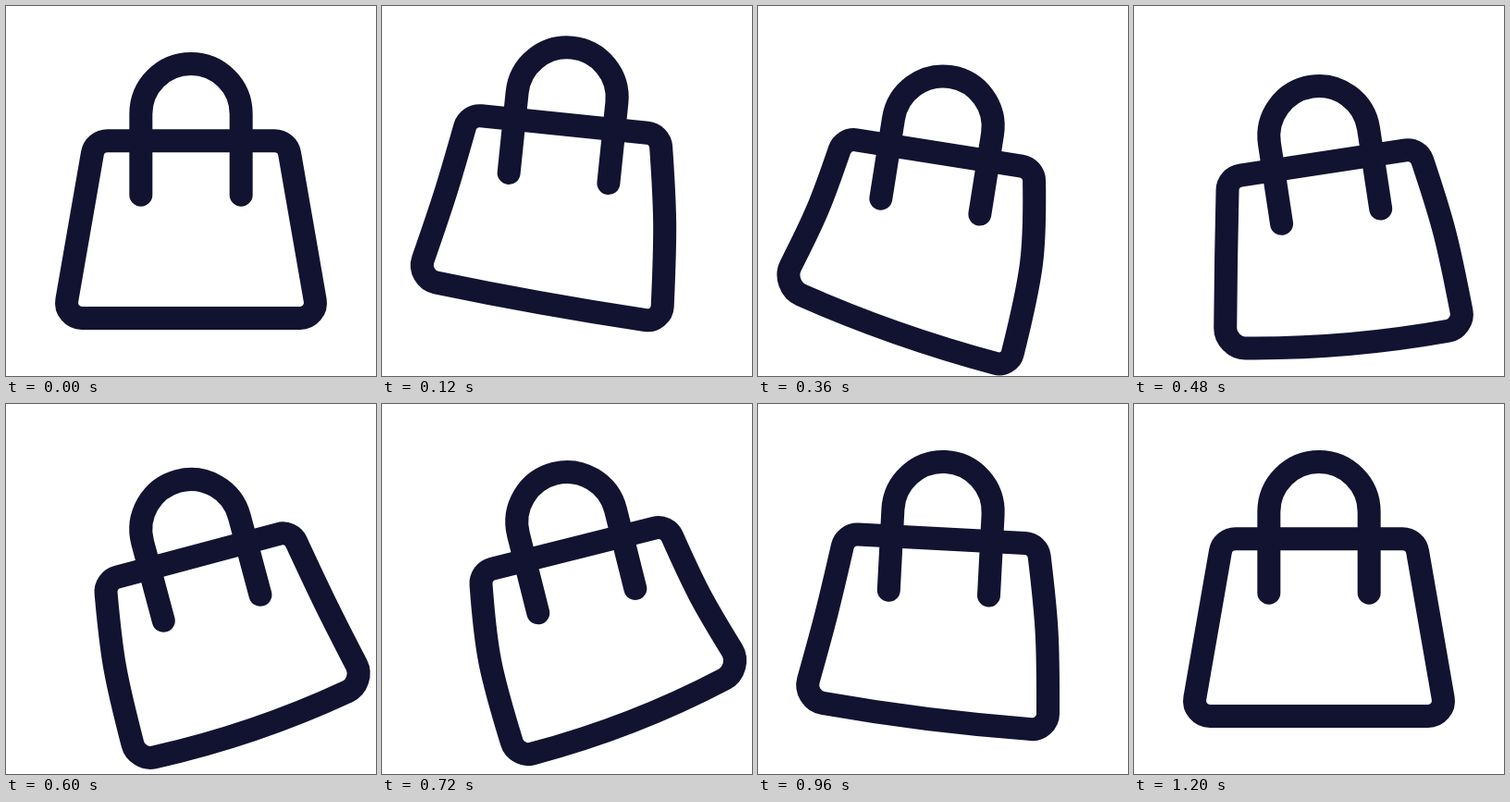
Write an HTML page that moves like this. It is 400 px wide and 400 px high and loops after 3230 ms.

```html
<!DOCTYPE html>
<html lang="en">
<head>
<meta charset="utf-8">
<title>Swinging bag</title>
<style>
  html, body { margin: 0; width: 100%; height: 100%; overflow: hidden; background: #fff; }
  svg { display: block; width: 100vw; height: 100vh; }
  path { fill: none; stroke: #121331; stroke-width: 25; stroke-linecap: round; stroke-linejoin: round; }
</style>
</head>
<body>
<svg viewBox="0 0 400 400">
  <g id="bag">
    <path d="M145.83 204.17V116.67a54.17 54.17 0 0 1 108.34 0V204.17"/>
    <path id="body"/>
  </g>
</svg>
<script>
const LOOP = 3230, STEP = 30, PIVOT = 116.67;
const bag = document.getElementById('bag');
const body = document.getElementById('body');

// Tracks: [time, values, x1, x2]; x1 and x2 shape the ease that leads to the key.
const LIFT = [[0, [0]], [187, [-25]], [436, [24.5]], [970, [0]]];
const SWING = [[0, [0]], [277, [14.7]], [663, [-15.6], .33, .3], [995, [3.6]], [1200, [0]]];
// Offsets of the two bottom corners (left x, y, right x, y), then the sag between them.
const REST = [0, 0, 0, 0, 0];
const POSE = [
  [0, REST],
  [290, [-11.5, -26, -29, 28.5, 10]],
  [715, [22.7, 13, 9, -20.5, 15]],
  [1015, [-5.5, -12.5, -14, 12, 6]],
  [1200, REST]
];

function ease(u, x1 = 1 / 3, x2 = 2 / 3) {
  let lo = 0, hi = 1;
  for (let i = 0; i < 24; i++) {
    const m = (lo + hi) / 2, n = 1 - m;
    if (3 * n * n * m * x1 + 3 * n * m * m * x2 + m * m * m < u) lo = m; else hi = m;
  }
  return lo * lo * (3 - 2 * lo);
}

function valuesAt(track, t) {
  const i = track.findIndex(key => key[0] > t);
  if (i < 0) return track[track.length - 1][1];
  const [t0, from] = track[i - 1], [t1, to, x1, x2] = track[i];
  const k = ease((t - t0) / (t1 - t0), x1, x2);
  return from.map((v, j) => v + (to[j] - v) * k);
}

const mix = (p, q, k) => [p[0] + (q[0] - p[0]) * k, p[1] + (q[1] - p[1]) * k];
const dist = (p, q) => Math.hypot(q[0] - p[0], q[1] - p[1]);
const toward = (p, q, d) => mix(p, q, d / dist(p, q));
const put = (...pts) => pts.map(p => p.map(v => v.toFixed(2)).join(' ')).join(' ');
const corner = (p, c, q, k) => 'C' + put(mix(p, c, k), mix(q, c, k), q);

// One side: rigid at the top, bending at a knee on the way to the bottom corner.
function side(top, foot, dx, dy) {
  const end = [foot[0] + dx, foot[1] + dy];
  const start = toward(top, foot, 13.8);
  const knee = toward(start, foot, dist(start, end) * .43);
  const reach = 19.7 - .2 * dy;
  const heel = toward(end, knee, reach);
  return { top, start, end, heel, reach, c1: mix(start, knee, .88), c2: mix(heel, knee, .88) };
}

function bodyPath([lx, ly, rx, ry, sag]) {
  const L = side([95.8, 145.83], [62.4, 337.5], lx, ly);
  const R = side([304.2, 145.83], [337.6, 337.5], rx, ry);
  const low = mix(L.end, R.end, .5);
  low[1] += sag;
  const l = toward(L.end, low, L.reach), r = toward(R.end, low, R.reach);
  const a = toward(L.top, R.top, 13.8), b = toward(R.top, L.top, 13.8);
  return 'M' + put(a) + corner(a, L.top, L.start, .58) +
    'C' + put(L.c1, L.c2, L.heel) + corner(L.heel, L.end, l, .52) +
    'Q' + put(low, r) + corner(r, R.end, R.heel, .52) +
    'C' + put(R.c2, R.c1, R.start) + corner(R.start, R.top, b, .58) + 'Z';
}

function draw(ms) {
  const t = Math.floor((ms % LOOP) / STEP) * STEP;
  bag.setAttribute('transform',
    `translate(0 ${valuesAt(LIFT, t)}) rotate(${valuesAt(SWING, t)} 200 ${PIVOT})`);
  body.setAttribute('d', bodyPath(valuesAt(POSE, t)));
}

let start;
function tick(now) {
  start ??= now;
  draw(Math.max(0, now - start));
  requestAnimationFrame(tick);
}
draw(0);
requestAnimationFrame(tick);
</script>
</body>
</html>
```
